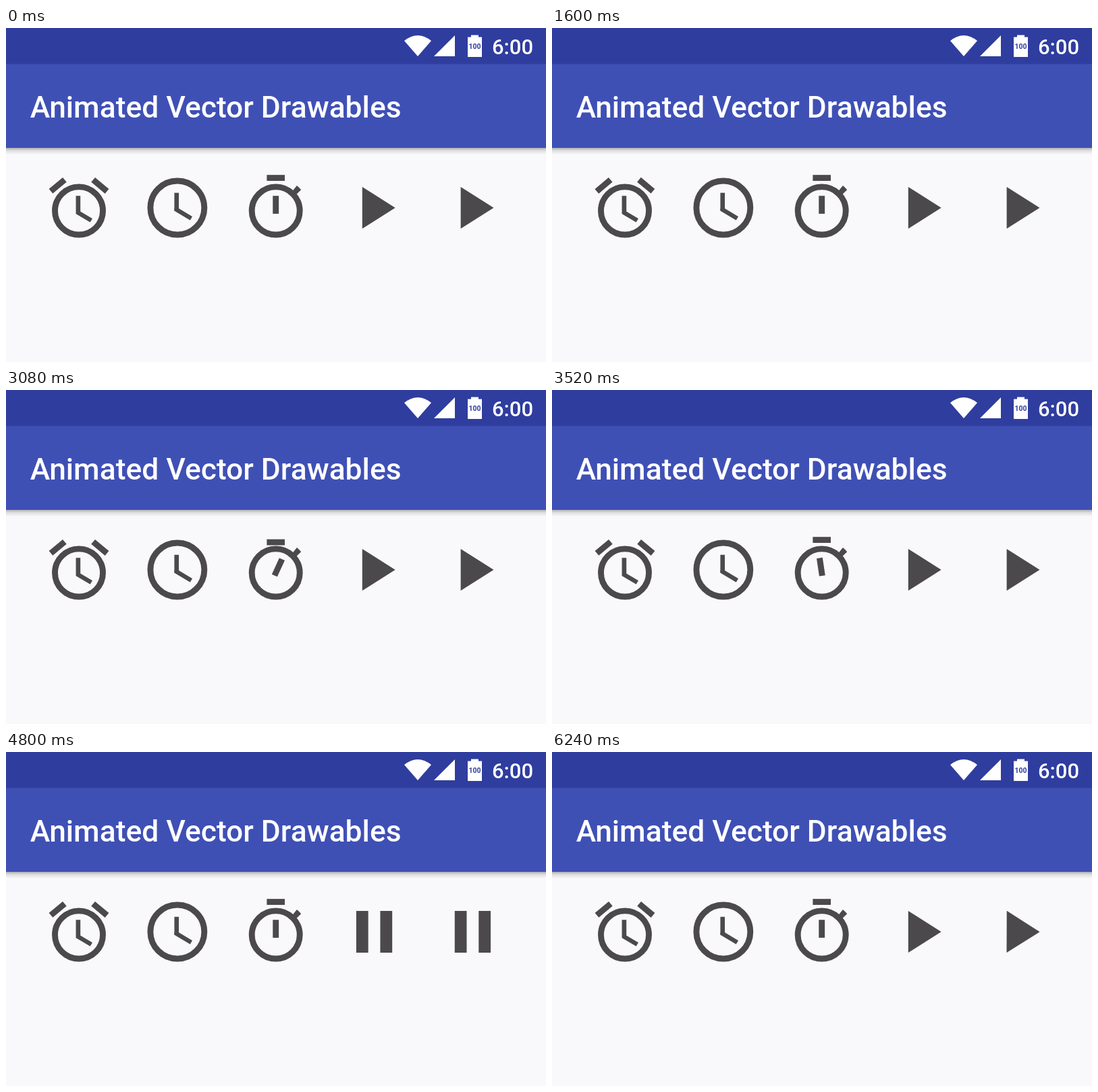
Recreate the animation shown at these times as an HTML page. Size 800 by 496 pixels, loop 6.28 s.

```html
<!DOCTYPE html>
<html lang="en">
<head>
<meta charset="utf-8">
<title>Animated Vector Drawables</title>
<style>
  html, body { margin: 0; width: 100%; height: 100%; overflow: hidden; background: #f9f8fb; }
  svg { display: block; width: 100%; height: 100%; }
  text { font-family: Roboto, sans-serif; font-weight: 500; fill: #fff; }
  .icons { fill: #4b494c; }
  .ring { fill: none; stroke: #4b494c; stroke-width: 2; }
</style>
</head>
<body>
<svg viewBox="0 0 800 496">
  <defs>
    <linearGradient id="shadow" x2="0" y2="1">
      <stop offset="0" stop-color="#000" stop-opacity=".3"/>
      <stop offset=".4" stop-color="#000" stop-opacity=".11"/>
      <stop offset="1" stop-color="#000" stop-opacity="0"/>
    </linearGradient>
  </defs>
  <rect width="800" height="496" fill="#f9f8fb"/>
  <rect y="178" width="800" height="10" fill="url(#shadow)"/>
  <rect width="800" height="178" fill="#3f50b5"/>
  <rect width="800" height="53.5" fill="#2f3d9f"/>

  <g fill="#fff">
    <path d="M610 42L590 19Q610 3 630 19Z"/>
    <path d="M665 11V42H634Z"/>
    <path d="M684 13.5H689V10.5H700V13.5H705V43H684Z"/>
  </g>
  <text x="694.5" y="31" text-anchor="middle" style="font-size:10.5px;font-weight:700;fill:#2f3d9f">100</text>
  <text x="720" y="38.8" font-size="31">6:00</text>
  <text x="35.7" y="132.7" font-size="44.3">Animated Vector Drawables</text>

  <g class="icons">
    <g class="icon">
      <path id="bells" d="M22 5.72L17.4 1.86 16.11 3.39 20.71 7.25ZM7.88 3.39L6.6 1.86 2 5.71 3.29 7.24Z"/>
      <circle class="ring" cx="12" cy="13" r="8"/>
      <path d="M12.5 8H11V14L15.75 16.85 16.5 15.62 12.5 13.25Z"/>
    </g>
    <g class="icon">
      <circle class="ring" cx="12" cy="12" r="9"/>
      <path id="minutes" d="M11 7H12.5V12.7L11 13Z"/>
      <path id="hours" d="M11 13L16.25 16.15 17 14.92 12.5 12.25 11 12.2Z"/>
    </g>
    <g class="icon">
      <path id="crown" d="M9 1H15V3H9Z"/>
      <circle class="ring" cx="12" cy="13" r="8"/>
      <path d="M17.3 6.7L19.04 4.56Q19.8 5.2 20.45 5.97L18.6 7.8Z"/>
      <path id="sweep" d="M11 8H13V14H11Z"/>
    </g>
    <g class="icon"><path id="morph"/></g>
    <g class="icon"><path id="spin"/></g>
  </g>
</svg>
<script>
const LOOP = 6280;
const $ = id => document.getElementById(id);

document.querySelectorAll('.icon').forEach((icon, i) =>
  icon.setAttribute('transform', `translate(${108 + 145.85 * i} 267) scale(4.44) translate(-12 -12)`));

// Accelerate-decelerate progress of a tween
const ease = (t, start, duration) => {
  const p = Math.min(1, Math.max(0, (t - start) / duration));
  return (1 - Math.cos(Math.PI * p)) / 2;
};
const there = (t, out, back) => ease(t, out, 300) - ease(t, back, 300);
const rotate = (id, angle, cy = 12) => $(id).setAttribute('transform', `rotate(${angle} 12 ${cy})`);

// Each shape is a list of four-cornered halves
const blend = (from, to, p) => from.map((half, i) =>
  'M' + half.map((v, j) => v + (to[i][j] - v) * p).join(' ') + 'Z').join('');

const cut = 11.4, slope = (cut - 8) * 7 / 11;
const playColumns = [
  [8, 5, cut, 5 + slope, cut, 19 - slope, 8, 19],
  [cut, 5 + slope, 19, 12, 19, 12, cut, 19 - slope]];
const pauseColumns = [
  [6, 5, 10, 5, 10, 19, 6, 19],
  [14, 5, 18, 5, 18, 19, 14, 19]];
const playRows = [
  [8, 5, 19, 12, 19, 12, 8, 12],
  [8, 12, 19, 12, 19, 12, 8, 19]];
const pauseRows = [
  [5, 6, 19, 6, 19, 10, 5, 10],
  [5, 14, 19, 14, 19, 18, 5, 18]];

function draw(t) {
  const ringing = t >= 1150 && t < 1755;
  rotate('bells', ringing ? 8 * Math.cos(Math.PI * (t - 1150) / 100) : 0);

  const turn = 360 * ease(t, 2085, 600);
  rotate('hours', turn);
  rotate('minutes', 3 * turn);

  rotate('sweep', 360 * ease(t, 2980, 600), 13);
  const press = ease(t, 2940, 120) - ease(t, 3060, 120);
  $('crown').setAttribute('transform', `translate(0 ${0.85 * press})`);

  $('morph').setAttribute('d', blend(playColumns, pauseColumns, there(t, 3907, 5305)));

  const paused = there(t, 4495, 5950);
  // A hairline overlap hides the seam between the two halves
  const seam = paused < 0.01 ? 'M8 11.9H18.8V12.1H8Z' : '';
  $('spin').setAttribute('d', blend(playRows, pauseRows, paused) + seam);
  rotate('spin', 90 * paused);
}

function frame() {
  draw(performance.now() % LOOP);
  requestAnimationFrame(frame);
}
frame();
</script>
</body>
</html>
```
